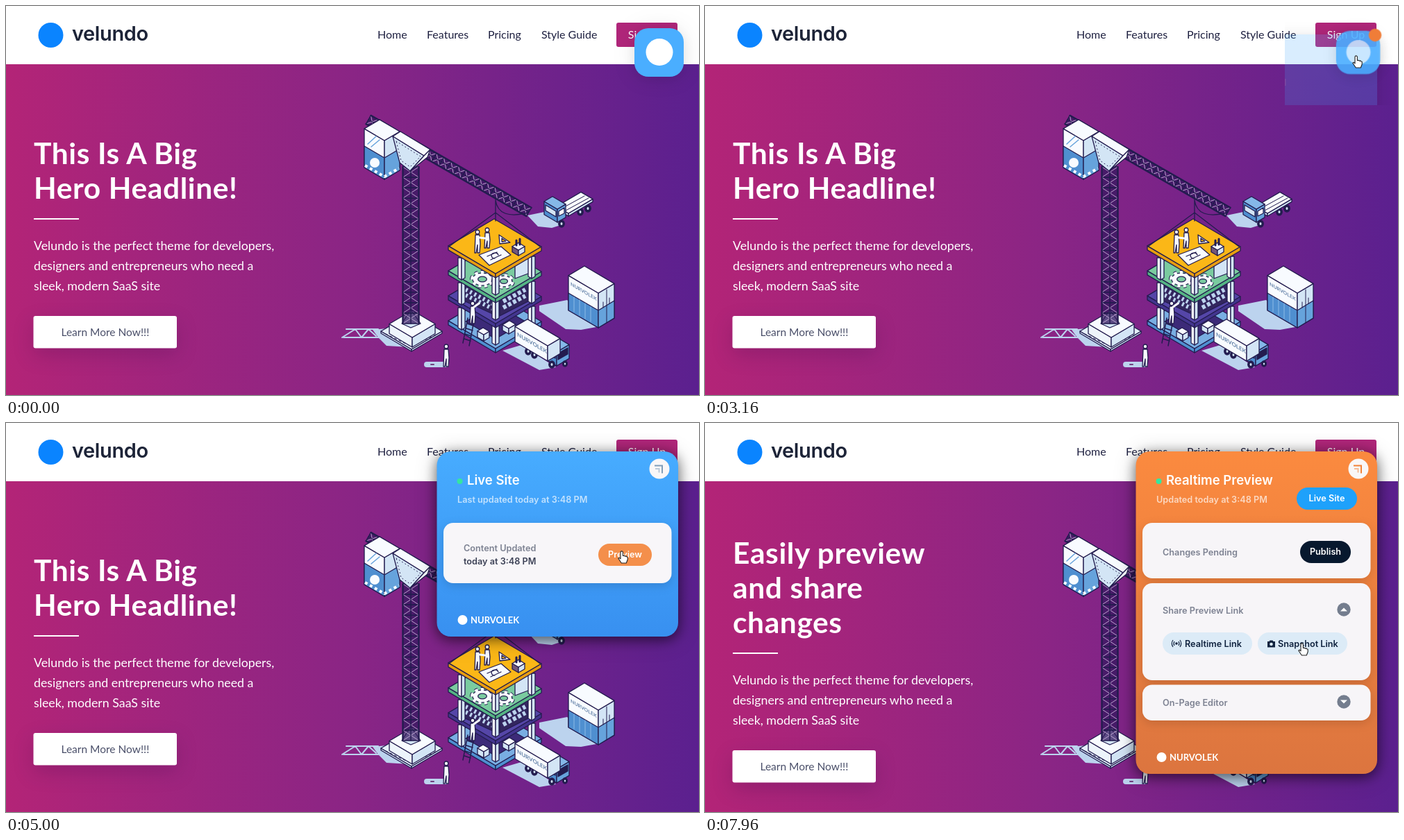
Recreate the animation shown at these times as an HTML page. Size 998 by 561 pixels, loop 8000 ms.

```html
<!DOCTYPE html>
<html lang="en">
<head>
<meta charset="utf-8">
<title>Theme preview</title>
<style>
  html, body { margin: 0; width: 100%; height: 100%; overflow: hidden; background: #fff; }
  svg { position: absolute; left: 0; top: 0; width: 998px; height: 561px; overflow: hidden; }
  .page { font-family: Lato, "Open Sans", sans-serif; }
  .ui { font: 600 12.7px Inter, Roboto, sans-serif; }
  .headline { font-size: 42.5px; font-weight: 700; letter-spacing: .6px; fill: #fff; }
  .copy { font-size: 17.8px; fill: #fff; }
  .nav { font-size: 16px; fill: #1e2040; }
  .wordmark { font: 600 29px Inter, sans-serif; letter-spacing: -.4px; fill: #1d2438; }
  .title { font-size: 18.5px; fill: #fff; }
  .soft { fill: #fff; opacity: .68; }
  .muted { fill: #7d8292; }
  .brand { font: 700 13px Lato, sans-serif; fill: #fff; }
  .mid { text-anchor: middle; }
  .panel-bg { filter: drop-shadow(0 4px 9px rgba(0,0,0,.5)) drop-shadow(0 2px 14px rgba(0,0,0,.22)); }
  .card { filter: drop-shadow(0 4px 7px rgba(0,0,0,.13)); }
  .cta { filter: drop-shadow(0 10px 14px rgba(20,0,60,.17)); }

  .first { animation: first 8s step-end infinite; }
  .second { animation: second 8s step-end infinite; }
  .below { animation: below 8s step-end infinite; }
  @keyframes first { 0% { opacity: 1 } 68.5%, 100% { opacity: 0 } }
  @keyframes second { 0% { opacity: 0 } 68.5%, 100% { opacity: 1 } }
  @keyframes below { 0% { transform: none } 68.5%, 100% { transform: translateY(25px) } }

  .live { animation: live 8s ease-out infinite; }
  @keyframes live {
    0%, 39% { clip-path: inset(15px 0 460px 890px); opacity: 0 }
    42.5% { clip-path: inset(15px 0 281px 652px); opacity: .88 }
    45%, 70% { clip-path: inset(15px 0 190px 560px); opacity: 1 }
    76%, 100% { clip-path: inset(15px 0 460px 890px); opacity: 0 }
  }
  .draft { animation: draft 8s ease-out infinite; }
  @keyframes draft {
    0%, 80.5% { clip-path: inset(15px 0 460px 890px); opacity: 0 }
    84% { clip-path: inset(15px 0 210px 652px); opacity: .88 }
    86.5%, 100% { clip-path: inset(15px 0 0 560px); opacity: 1 }
  }
  .hover { fill: #e2753c; animation: hover 8s infinite; }
  @keyframes hover { 0%, 56.5%, 100% { fill: #e2753c } 57.5%, 99% { fill: #f48f4b } }

  .grow { animation: grow 8s ease-in-out infinite; height: var(--h); }
  .drop { animation: drop 8s ease-in-out infinite; }
  .nudge { animation: nudge 8s ease-in-out infinite; }
  .links { animation: links 8s infinite; }
  .flip { transform-origin: 920px 269px; animation: flip 8s infinite; }
  @keyframes grow { 0%, 88.5% { height: calc(var(--h) - 88px) } 92%, 100% { height: var(--h) } }
  @keyframes drop { 0%, 88.5% { transform: translateY(-88px) } 92%, 100% { transform: none } }
  @keyframes nudge { 0%, 88.5% { transform: translateY(-13px) } 92%, 100% { transform: none } }
  @keyframes links { 0%, 90% { opacity: 0 } 92.5%, 100% { opacity: 1 } }
  @keyframes flip { 0%, 88.5% { transform: rotate(180deg) } 90%, 100% { transform: none } }

  .tile { transform-origin: 940.5px 67px; animation: tile 8s ease-out infinite;
    filter: drop-shadow(0 4px 10px rgba(0,0,0,.08)) drop-shadow(0 0 16px rgba(0,0,0,.08)); }
  @keyframes tile {
    0%, 39% { transform: none; opacity: 1 }
    42.5% { transform: scale(.54); opacity: .5 }
    45%, 70% { transform: scale(.4); opacity: 0 }
    76%, 80.5% { transform: none; opacity: 1 }
    84% { transform: scale(.54); opacity: .5 }
    86.5%, 100% { transform: scale(.4); opacity: 0 }
  }
  .tile rect { animation: skin 8s infinite; }
  @keyframes skin {
    0%, 39% { fill: #4aaeff; rx: 20px }
    42.5%, 60% { fill: #4aaeff; rx: 35px }
    70% { fill: #fc8a3e; rx: 35px }
    76%, 80.5% { fill: #fc8a3e; rx: 20px }
    84%, 100% { fill: #fc8a3e; rx: 35px }
  }
  .mark { animation: mark 8s infinite; }
  @keyframes mark { 0%, 39%, 76%, 80.5% { opacity: 1 } 41.5%, 73%, 83%, 100% { opacity: 0 } }
  .close { transform-origin: 941px 66px; animation: close 8s ease-out infinite; }
  @keyframes close {
    0%, 41% { transform: scale(0); opacity: 1; color: #48aaf6 }
    42.5% { transform: scale(.22) }
    46%, 60% { transform: none; color: #48aaf6 }
    72% { color: #f28238 }
    77.5% { transform: none; opacity: 1 }
    79% { transform: none; opacity: 0 }
    82% { transform: scale(0); opacity: 0 }
    84% { transform: scale(.22); opacity: 1 }
    87%, 100% { transform: none; opacity: 1; color: #f28238 }
  }
  .badge { transform-origin: 965px 42px; animation: badge 8s ease-in-out infinite; }
  @keyframes badge {
    0%, 10% { transform: scale(0) } 13% { transform: scale(1.15) }
    15%, 39% { transform: none } 41%, 100% { transform: scale(0) }
  }

  .cursor { animation: move 8s ease-in-out infinite; }
  @keyframes move {
    0%, 22% { transform: translate(1010px, 150px) }
    27.5% { transform: translate(946px, 114px) }
    34%, 40% { transform: translate(938px, 72px) }
    42.5% { transform: translate(929px, 71px) }
    49.5% { transform: translate(904px, 110px) }
    57%, 68% { transform: translate(887px, 185px) }
    77%, 81% { transform: translate(864px, 280px) }
    87%, 91.5% { transform: translate(918px, 264px) }
    97%, 100% { transform: translate(860px, 318px) }
  }
  .arrow { animation: arrow 8s step-end infinite; }
  .hand { animation: hand 8s step-end infinite; }
  @keyframes arrow { 0%, 41%, 70% { opacity: 1 } 33%, 56.5%, 86% { opacity: 0 } }
  @keyframes hand { 0%, 41%, 70% { opacity: 0 } 33%, 56.5%, 86% { opacity: 1 } }
</style>
</head>
<body>
<svg class="page" viewBox="0 0 998 561">
  <defs>
    <linearGradient id="hero">
      <stop stop-color="#b32477"/><stop offset=".5" stop-color="#8a2585"/><stop offset="1" stop-color="#5b208f"/>
    </linearGradient>
    <linearGradient id="blue" x2="0" y2="1"><stop stop-color="#47acff"/><stop offset="1" stop-color="#3890f0"/></linearGradient>
    <linearGradient id="orange" x2="0" y2="1"><stop stop-color="#fb8a3f"/><stop offset="1" stop-color="#dc753f"/></linearGradient>
  </defs>
  <rect width="998" height="561" fill="#fff"/>
  <rect y="84" width="998" height="477" fill="url(#hero)"/>
  <circle cx="64.5" cy="42" r="18" fill="#0a84ff"/>
  <text class="wordmark" x="95" y="50">velundo</text>
  <g class="nav">
    <text x="535" y="47">Home</text><text x="606" y="47">Features</text>
    <text x="694" y="47">Pricing</text><text x="771" y="47">Style Guide</text>
    <rect x="879" y="24" width="88" height="35" rx="3" fill="#b0267a"/>
    <text class="mid" x="923" y="47" fill="#fff">Sign Up</text>
  </g>
  <g class="headline first"><text x="40" y="228">This Is A Big</text><text x="40" y="278">Hero Headline!</text></g>
  <g class="headline second">
    <text x="40" y="203">Easily preview</text><text x="40" y="253">and share</text><text x="40" y="303">changes</text>
  </g>
  <g class="copy below">
    <rect x="40" y="306" width="65" height="2"/>
    <text x="40" y="352">Velundo is the perfect theme for developers,</text>
    <text x="40" y="381">designers and entrepreneurs who need a</text>
    <text x="40" y="410">sleek, modern SaaS site</text>
    <rect class="cta" x="39.5" y="447" width="206.5" height="46.5" rx="3"/>
    <text class="mid" x="143" y="475.5" font-size="15.5" fill="#4a4f69">Learn More Now!!!</text>
  </g>
  <g id="art" stroke="#231c4f" stroke-width="1.3" stroke-linejoin="round" stroke-linecap="round"></g>
</svg>

<svg class="ui live" viewBox="0 0 998 561">
  <rect class="panel-bg" x="620.5" y="41" width="347.5" height="267" rx="20" fill="url(#blue)"/>
  <circle cx="653.5" cy="84" r="4" fill="#35e6a0"/>
  <text class="title" x="664" y="89">Live Site</text>
  <text class="soft" x="650" y="115">Last updated today at 3:48 PM</text>
  <rect class="card" x="630" y="144" width="328.5" height="87" rx="14" fill="#f8f6f9"/>
  <text class="muted" x="659" y="185">Content Updated</text>
  <text x="659" y="204" fill="#3c4156">today at 3:48 PM</text>
  <rect class="hover" x="853" y="174" width="77" height="32" rx="16"/>
  <text class="mid" x="891.5" y="194" fill="#fff">Preview</text>
  <circle cx="657.5" cy="284" r="7" fill="#fff"/><text class="brand" x="669" y="289">NURVOLEK</text>
</svg>

<svg class="ui draft" viewBox="0 0 998 561">
  <rect class="panel-bg grow" style="--h:465px" x="620.5" y="41" width="347.5" rx="20" fill="url(#orange)"/>
  <circle cx="653.5" cy="84" r="4" fill="#35e6a0"/>
  <text class="title" x="664" y="89">Realtime Preview</text>
  <text class="soft" x="650" y="115">Updated today at 3:48 PM</text>
  <rect x="852" y="93" width="87" height="32" rx="16" fill="#1ea1fb"/>
  <text class="mid" x="895.5" y="113" fill="#fff">Live Site</text>
  <g fill="#f7f5f8">
    <rect class="card" x="630" y="144" width="328.5" height="80" rx="14"/>
    <rect class="card grow" style="--h:140px" x="630" y="231" width="328.5" rx="14"/>
    <rect class="card drop" x="630" y="377.5" width="328.5" height="51.5" rx="14"/>
  </g>
  <text class="muted" x="659" y="191">Changes Pending</text>
  <rect x="857" y="170" width="73" height="32" rx="16" fill="#07182e"/>
  <text class="mid" x="893.5" y="190" fill="#fff">Publish</text>
  <g class="nudge">
    <text class="muted" x="659" y="275">Share Preview Link</text>
    <g class="flip"><circle cx="920" cy="269" r="9.7" fill="#747d8e"/><path d="M915 271.5l5-5 5 5z" fill="#fff"/></g>
  </g>
  <g class="links" fill="#10233f">
    <rect x="659" y="302" width="129" height="32" rx="16" fill="#dcebf7"/>
    <rect x="796" y="302" width="129" height="32" rx="16" fill="#dcebf7"/>
    <circle cx="679" cy="318" r="1.8"/>
    <path d="M676 315q-2 3 0 6m6-6q2 3 0 6m-8-8q-3.5 5 0 10m10-10q3.5 5 0 10" fill="none" stroke="#10233f" stroke-width="1.2"/>
    <path d="M810 315h2.5l1-1.5h4l1 1.5h2.5v8.5h-11z"/><circle cx="815.5" cy="319" r="2.3" fill="#dcebf7"/>
    <text x="691" y="322.5">Realtime Link</text><text x="825" y="322.5">Snapshot Link</text>
  </g>
  <g class="drop">
    <text class="muted" x="659" y="407.5">On-Page Editor</text>
    <circle cx="920" cy="402" r="9.7" fill="#747d8e"/><path d="M915 399.5l5 5 5-5z" fill="#fff"/>
    <circle cx="657.5" cy="482" r="7" fill="#fff"/><text class="brand" x="669" y="487">NURVOLEK</text>
  </g>
</svg>

<svg viewBox="0 0 998 561">
  <g class="tile">
    <rect x="905" y="32" width="71" height="70"/>
    <circle class="mark" cx="941" cy="66.5" r="19.5" fill="#fff"/>
  </g>
  <circle class="badge" cx="965" cy="42" r="10.7" fill="#f07d38"/>
  <g class="close">
    <circle cx="941" cy="66" r="14.5" fill="#f9f7f8"/>
    <path d="M934 61.5h11v11" fill="none" stroke="currentColor" stroke-width="2"/>
    <path d="M935 66h5.500v5.500" fill="none" stroke="currentColor" stroke-width="2" opacity=".5"/>
  </g>
  <g class="cursor" stroke-linejoin="round">
    <path class="arrow" d="M0 0V15.5l3.8-3.5 2.6 6 2.8-1.2-2.6-5.8H11z" fill="#111" stroke="#fff" stroke-width="1.1"/>
    <path class="hand" d="M-2 1.6a1.7 1.7 0 0 1 3.4 0V6.5l1.6-.3 1.3.9 1.6-.2 1.2 1.1 1.1.3V12l-1.9 5h-7l-4.5-6.8 1.4-1 1.8 1.7z" fill="#fff" stroke="#222" stroke-width="1.1"/>
  </g>
</svg>

<script>
  const SLOPE = .59, WHITE = '#f8fbff', PALE = '#d3e5f5', BLUE = '#66a3dc', MID = '#4f8fd0', NAVY = '#231c4f';
  const SHADE = '#bcd3ee';

  const poly = (points, fill, more = '') => `<polygon points="${points}" fill="${fill}" ${more}/>`;
  const line = (d, color = NAVY, width = 1.3, more = '') =>
    `<path d="${d}" fill="none" stroke="${color}" stroke-width="${width}" ${more}/>`;
  const disc = (x, y, rx, ry, fill, more = '') =>
    `<ellipse cx="${x}" cy="${y}" rx="${rx}" ry="${ry}" fill="${fill}" ${more}/>`;
  const shadow = points => poly(points, SHADE, 'stroke="none"');

  // Isometric box: (x, y) is the front corner of its top face.
  function box(x, y, right, left, h, top, leftFill = top, rightFill = leftFill) {
    const r = [x + right, y - right * SLOPE], l = [x - left, y - left * SLOPE];
    const back = [x + right - left, y - (right + left) * SLOPE], low = p => [p[0], p[1] + h];
    return poly([[x, y], l, low(l), low([x, y])], leftFill) +
      poly([[x, y], r, low(r), low([x, y])], rightFill) + poly([[x, y], r, back, l], top);
  }

  function truss(x1, y1, x2, y2, width, cells) {
    const len = Math.hypot(x2 - x1, y2 - y1);
    const nx = -(y2 - y1) / len * width / 2, ny = (x2 - x1) / len * width / 2;
    const at = (i, side) => {
      const k = i / cells;
      return `${(x1 + (x2 - x1) * k + nx * side).toFixed(1)} ${(y1 + (y2 - y1) * k + ny * side).toFixed(1)}`;
    };
    const joints = Array.from({ length: cells + 1 }, (_, i) => i);
    const zigzag = s => 'M' + joints.map(i => at(i, i % 2 ? s : -s)).join('L');
    const ties = joints.map(i => `M${at(i, -1)}L${at(i, 1)}`).join('');
    const rail = s => `M${at(0, s)}L${at(cells, s)}`;
    return line(rail(0), '#35195f', width, 'stroke-opacity=".75" stroke-linecap="butt"') +
      line(ties, NAVY, 1.6) + line(zigzag(1) + zigzag(-1), '#c9b0da', .9) +
      line(rail(1) + rail(-1), NAVY, 2.4) + line(rail(0), NAVY, 1.4);
  }

  const label = (x, y, size) =>
    `<text transform="matrix(1 ${SLOPE} 0 1 ${x} ${y})" font-size="${size}" font-weight="700" fill="#6482a8" stroke="none">NURVOLEK</text>`;
  const person = (x, y, h) => disc(x, y - h + 3, 2.8, 3, WHITE) +
    poly([[x - 3, y - h + 7], [x + 3, y - h + 7], [x + 4, y - h * .4], [x + 3, y], [x, y], [x, y - h * .35], [x - 2, y], [x - 4, y]], WHITE);
  const post = (x, y, h = 32) => poly([[x - 5, y - h], [x, y - h], [x, y], [x - 5, y - 3]], WHITE) +
    poly([[x, y - h], [x + 5, y - h], [x + 5, y - 3], [x, y]], PALE);
  const wheel = (x, y, r = 5) => disc(x, y, r * .85, r, NAVY) + disc(x, y, r * .3, r * .4, PALE, 'stroke="none"');

  function gear(x, y, r) {
    const teeth = (color, width) =>
      line(`M${x - r} ${y}a${r} ${r * .65} 0 1 1 0 .1`, color, width, 'stroke-dasharray="4 4" stroke-linecap="butt"');
    return teeth(NAVY, 8) + disc(x, y, r, r * .65, WHITE) + teeth(WHITE, 6) + disc(x, y, r * .45, r * .28, '#7acb9f');
  }

  function crane() {
    return shadow('528,467 558,464 580,492 548,490 536,478') +
      line('M484 478L503 466L512 478L522 466L533 476M490 466H536M486 478H540', SHADE, 2) +
      box(584, 495, 44, 44, 3, '#e4eff9', PALE, PALE) +
      line('M547 473L584 491L621 473', NAVY, 1, 'stroke-dasharray="3 4"') +
      box(585, 478, 33, 33, 14, WHITE, '#edf4fb', PALE) +
      poly('570,458 583,438 597,458 583,464', PALE) +
      truss(583, 232, 583, 458, 23, 15) +
      truss(522, 164, 753, 297, 14, 22) +
      box(545, 194, 22, 29, 56, WHITE, WHITE, PALE) +
      poly('516,202 545,219 545,250 516,233', MID) + poly('545,219 567,206 567,237 545,250', BLUE) +
      line('M517 230L545 246L566 234', WHITE, 4, 'stroke-dasharray="4 4" stroke-linecap="butt"') +
      line('M521 199L533 188M526 203L538 193', BLUE, 1.5) +
      disc(531, 226, 7, 7, WHITE, 'stroke="none"') +
      poly('557,188 568,181 611,207 602,216', WHITE) +
      poly('557,188 602,216 582,238 567,226', PALE) + poly('602,216 611,207 607,218 582,238', WHITE) +
      line('M562 195L597 217L582 232L569 223Z', NAVY, 1, 'stroke-dasharray="1 4"');
  }

  function building() {
    const slab = (y, top, side) => box(705, y, 66, 68, 6, top, side, side);
    const posts = y => post(656, y - 27) + post(757, y - 29) + post(705, y - 5);
    return slab(494, '#79aee2', MID) +
      poly('662,455 705,430 748,455 705,480', '#3c2a78') +
      box(688, 474, 8, 9, 9, WHITE, PALE) + box(724, 465, 10, 9, 8, WHITE, PALE) + posts(494) +
      slab(458, '#5546a8', '#43358f') +
      poly('657,398 705,422 705,446 657,424', '#33265f') +
      line('M662 409L702 430M662 417L702 437', SHADE, 6, 'stroke-dasharray="3 4" stroke-linecap="butt"') +
      poly('711,421 752,399 752,426 711,447', '#33265f') +
      line('M716 426L748 409M716 435L748 418', SHADE, 6, 'stroke-dasharray="5 3" stroke-linecap="butt"') + posts(458) +
      slab(422, '#7acb9f', '#55b484') +
      poly('733,370 757,357 757,384 733,393', PALE) + gear(686, 394, 14) + gear(717, 397, 12) + posts(422) +
      slab(386, '#fbb717', '#e89d10') +
      line('M658 486L665 450M667 490L674 454M660 480l9 3M661 473l9 3M663 465l9 3M664 458l9 3', NAVY, 1.5) +
      person(672, 458, 32) + line('M674 434L681 429', WHITE, 3) +
      person(679, 356, 33) + person(693, 349, 29) + line('M682 334L690 335', WHITE, 3) +
      poly('710,330 726,341 711,343', WHITE) + poly('714,335 720,339 714,340', '#fbb717') +
      poly('681,359 713,347 727,359 696,374', WHITE) + line('M693 361l14-6M698 366l15-7M704 364a5 4 0 1 1 5-5') +
      box(738, 352, 9, 9, 8, WHITE, '#73577a', PALE) + line('M735 338v7M740 336v8', NAVY, 3) +
      line('M705 277V300M705 298L638 347M705 298L769 347M705 298V310M705 280Q709 309 752 298');
  }

  const flatbed = () => shadow('751,302 780,296 802,315 786,320 766,318') +
    wheel(827, 297) + wheel(838, 292) +
    box(810, 299, 35, 17, 4, WHITE, PALE, PALE) + line('M802 291L833 274M806 295L839 277', NAVY, 1) +
    box(794, 293, 12, 19, 19, '#85b8e8', MID, BLUE) + poly('777,287 792,296 792,304 777,295', PALE) +
    poly('796,296 804,291 804,299 796,303', WHITE) + wheel(800, 314);

  const container = () => shadow('768,432 808,424 850,463 828,467 806,466 768,440') +
    box(853, 414, 23, 43, 50, WHITE, WHITE, PALE) +
    poly('810,414 853,439 853,464 810,439', MID) + poly('853,439 876,425 876,450 853,464', BLUE) +
    line('M865 409V457M860 427v8M869 421v8', NAVY, 1) +
    line('M818 420V441M826 424V446M834 429V451M842 434V455', '#8dbbe6', 1) + label(813, 403, 7);

  const lorry = () => shadow('715,497 742,489 792,521 768,525') +
    wheel(752, 498) + wheel(761, 503) +
    box(793, 499, 18, 15, 20, '#85b8e8', MID, BLUE) +
    poly('795,501 809,493 809,502 795,510', NAVY) + poly('781,494 791,500 791,508 781,502', PALE) +
    box(780, 490, 18, 47, 22, WHITE, WHITE, PALE) + label(736, 476, 8) +
    wheel(786, 517) + wheel(805, 516, 4);

  const walker = () => line('M606 517H634', SHADE, 8) + line('M612 517h4', '#70407f', 2) + person(634, 520, 32);

  document.getElementById('art').innerHTML =
    [crane, flatbed, container, building, lorry, walker].map(draw => draw()).join('');
</script>
</body>
</html>
```
